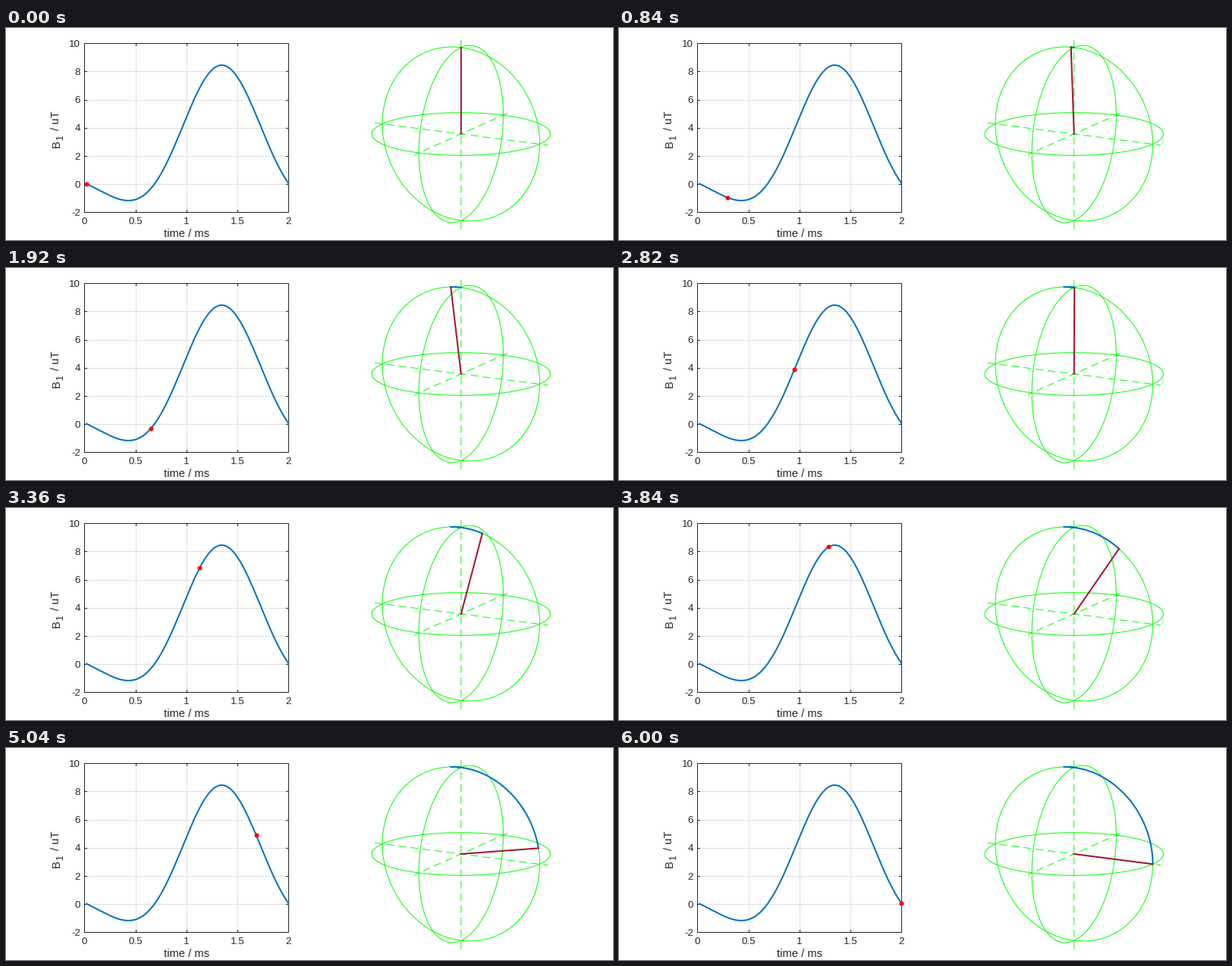
A matplotlib script for the animation above (6.06 s loop, 800 px wide and 280 px high).

```python
import numpy as np
import matplotlib.pyplot as plt
from matplotlib.animation import FuncAnimation

W, H, DPI = 800, 280, 100
FRAMES, STEP = 101, 60
PX = 72 / DPI                      # points per pixel
INK, GRID = "#262626", "#dedede"
GREEN, BLUE, MAROON, RED = "#00ff00", "#0072bd", "#a2142f", "#ff0000"

plt.rcParams["font.family"] = "Liberation Sans"

fig = plt.figure(figsize=(W / DPI, H / DPI), dpi=DPI, facecolor="white")
ax = fig.add_axes([0, 0, 1, 1])
ax.set_xlim(0, W)
ax.set_ylim(H, 0)
ax.axis("off")


def line(x, y, color, width=1.0, z=2, **kw):
    return ax.plot(x, y, color=color, lw=width * PX, zorder=z, **kw)[0]


def label(x, y, text, size, ha="center", **kw):
    ax.text(x, y, text, fontsize=size * PX, color=INK, ha=ha,
            va="baseline", **kw)


# ---- pulse plot ----
LEFT, RIGHT, TOP, BOTTOM = 103.4, 372.2, 20.25, 243.25


def px(t):
    return LEFT + (RIGHT - LEFT) * t / 2


def py(b):
    return BOTTOM - (BOTTOM - TOP) * (b + 2) / 12


def pulse(t):
    """Sinc with two lobes before the peak, tapered by a raised cosine."""
    u = (t - 1.346) / 0.66
    return 8.45 * np.sinc(u) * (0.775 + 0.225 * np.cos(np.pi * u / 2))


TICK = 3
for t in (0, 0.5, 1, 1.5, 2):
    x = px(t)
    line([x, x], [TOP, BOTTOM], GRID, z=1)
    line([x, x], [BOTTOM, BOTTOM - TICK], INK, z=4)
    line([x, x], [TOP, TOP + TICK], INK, z=4)
    label(x, 259, f"{t:g}", 13.33)
for b in range(-2, 11, 2):
    y = py(b)
    line([LEFT, RIGHT], [y, y], GRID, z=1)
    line([LEFT, LEFT + TICK], [y, y], INK, z=4)
    line([RIGHT, RIGHT - TICK], [y, y], INK, z=4)
    label(98.2, y + 4.6, str(b), 13.33, ha="right")
line([LEFT, RIGHT, RIGHT, LEFT, LEFT], [TOP, TOP, BOTTOM, BOTTOM, TOP], INK, z=4)
label(237.5, 276, "time / ms", 14.8)
upright = dict(rotation=90, rotation_mode="anchor")
label(70.5, 157.5, "B", 14.8, ha="left", **upright)
label(75, 147.5, "1", 12, ha="left", **upright)
label(70.5, 109, "/ uT", 14.8, ha="right", **upright)

fine = np.linspace(0.02, 2, 400)
line(px(fine), py(pulse(fine)), BLUE, 2, z=5)

# ---- sphere ----
CENTER = np.array([599.75, 140.0])
RADIUS, AZ, EL = 117.7, np.radians(28.2), np.radians(13.9)
X = RADIUS * np.array([np.sin(AZ), -np.cos(AZ) * np.sin(EL)])
Y = RADIUS * np.array([np.cos(AZ), np.sin(AZ) * np.sin(EL)])
Z = RADIUS * np.array([0, -np.cos(EL)])


def on_circle(a, b, angle):
    """Points at the given angles from a towards b."""
    return CENTER + np.outer(np.cos(angle), a) + np.outer(np.sin(angle), b)


turn = np.linspace(0, 2 * np.pi, 241)
for a, b in ((X, Y), (Z, X), (Z, Y)):
    line(*on_circle(a, b, turn).T, GREEN)
for axis in (-X, Y, Z):
    ends = np.array([CENTER - 1.1 * axis, CENTER + 1.1 * axis])
    line(*ends.T, GREEN, linestyle=(0, (10, 6)), dash_capstyle="butt",
         snap=False)

# ---- motion: flip angle is the running sum of the pulse ----
times = np.linspace(0.02, 2, FRAMES)
amp = pulse(times)
flip = np.cumsum(amp)
flip *= np.pi / 2 / flip[-1]
tips = on_circle(Z, Y, flip)

trail = line([], [], BLUE, 2, z=6)
arrow = line([], [], MAROON, 2, z=7, snap=False)
dot = line([], [], RED, z=8, marker="o", markersize=6 * PX,
           markeredgewidth=0, snap=False)


def draw(i):
    trail.set_data(*tips[:i + 1].T)
    arrow.set_data(*np.array([CENTER, tips[i]]).T)
    dot.set_data([px(times[i])], [py(amp[i])])
    return trail, arrow, dot


anim = FuncAnimation(fig, draw, frames=FRAMES, interval=STEP,
                     repeat=True, repeat_delay=0)
plt.show()
```
